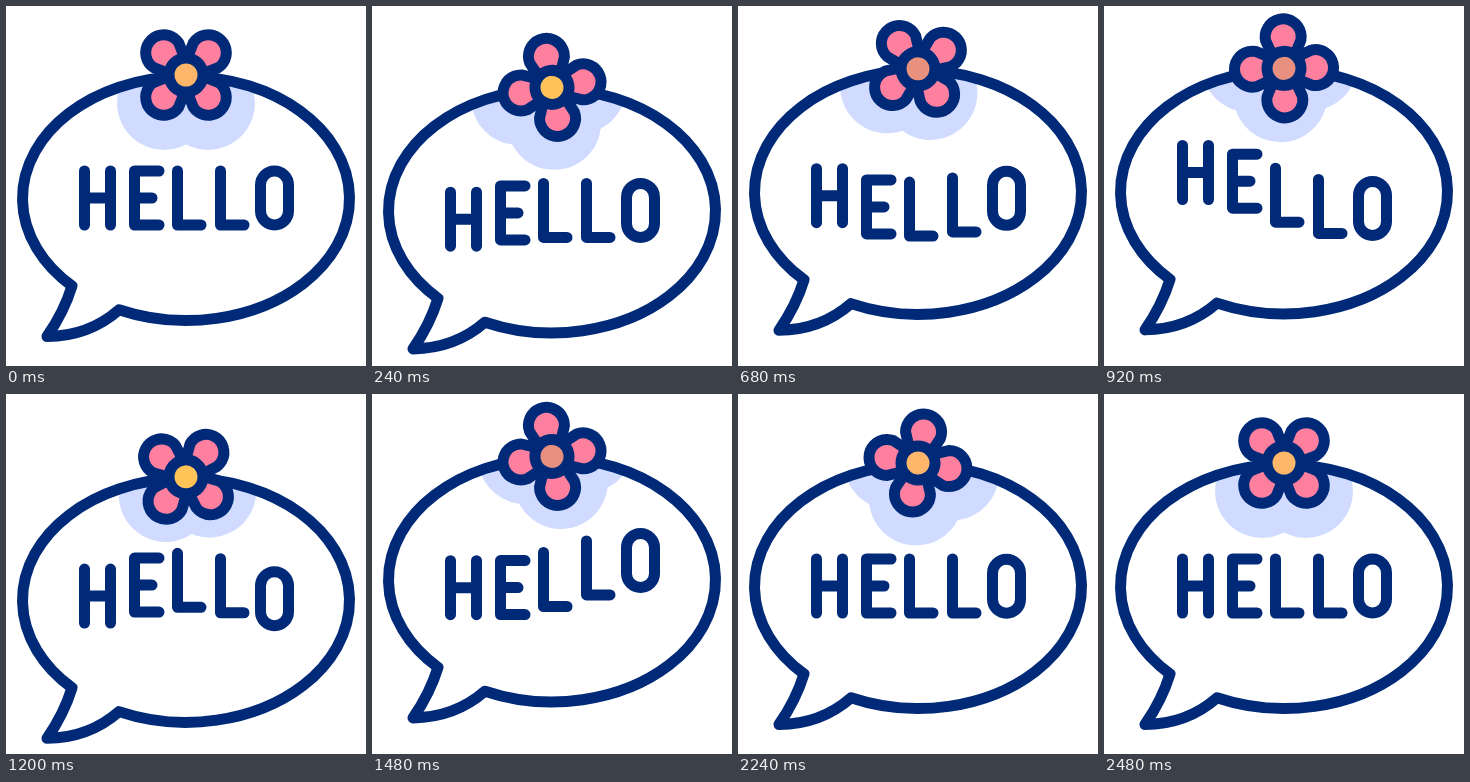
Animation of 360x360 px, one loop 2520 ms. Source, as an HTML page with a canvas:

```html
<!DOCTYPE html>
<html lang="en">
<head>
<meta charset="utf-8">
<title>Hello</title>
<style>
  html, body { margin: 0; width: 100%; height: 100%; overflow: hidden; background: #fff; }
  canvas { display: block; width: 360px; height: 360px; }
</style>
</head>
<body>
<canvas id="stage"></canvas>
<script>
const SIZE = 360, LOOP = 2520, STEP = 40, SPIN = 2480;
const NAVY = '#002a78', PINK = '#ff7f9f', SHADE = '#d0dbff';
const LETTER_DELAY = 120;

// Motion tracks: [time in ms, vertical offset]
const BUBBLE = [[0, 0], [430, 21], [790, -13.5], [1180, 14], [1520, -7.3], [1930, 8], [2240, 0]];
const LETTER = [[0, 0], [480, 17.5], [960, -19.5], [1410, 9], [1800, 0]];

const canvas = document.getElementById('stage');
const ctx = canvas.getContext('2d');
const ratio = window.devicePixelRatio || 1;
canvas.width = canvas.height = SIZE * ratio;

const mix = (a, b, p) => a + (b - a) * p;
const clamp = (v, lo, hi) => Math.min(hi, Math.max(lo, v));

function track(keys, t) {
  if (t <= keys[0][0]) return keys[0][1];
  for (let i = 1; i < keys.length; i++) {
    const [t0, v0] = keys[i - 1], [t1, v1] = keys[i];
    if (t < t1) return mix(v0, v1, (1 - Math.cos(Math.PI * (t - t0) / (t1 - t0))) / 2);
  }
  return keys[keys.length - 1][1];
}

function bubblePath() {
  const path = new Path2D();
  const rad = Math.PI / 180;
  path.ellipse(180, 192.5, 163.5, 122, 0, 134.2 * rad, (360 + 114.2) * rad);
  path.quadraticCurveTo(83, 330, 41, 330.5);
  path.quadraticCurveTo(58, 306, 66, 280);
  path.closePath();
  return path;
}

function petalPath() {
  const path = new Path2D();
  path.moveTo(-9, -8);
  path.lineTo(-17.6, -28);
  path.arc(0, -31.5, 18, Math.PI - 0.2, 0.2);
  path.lineTo(9, -8);
  path.closePath();
  return path;
}

function roundedO() {
  const path = new Path2D();
  path.arc(268.5, 179, 14, Math.PI, 0);
  path.arc(268.5, 205, 14, 0, Math.PI);
  path.closePath();
  return path;
}

const bubble = bubblePath();
const petal = petalPath();
const letters = [
  new Path2D('M78.5 165V219M104.5 165V219M78.5 192H104.5'),
  new Path2D('M153 165H128.5V219H153M128.5 192H146'),
  new Path2D('M171.5 165V219H195'),
  new Path2D('M214.5 165V219H238'),
  roundedO()
];

function circle(x, y, r) {
  ctx.beginPath();
  ctx.arc(x, y, r, 0, Math.PI * 2);
}

function fourTimes(draw) {
  for (let i = 0; i < 4; i++) {
    ctx.save();
    ctx.rotate(Math.PI / 4 + i * Math.PI / 2);
    draw();
    ctx.restore();
  }
}

// The flower's heart warms as the bubble sinks and reddens as it rises.
function heartColor(y) {
  const base = [254, 183, 106];
  const end = y < 0 ? [231, 144, 127] : [255, 200, 78];
  const p = clamp(y < 0 ? -y / 6.5 : y / 20, 0, 1);
  return `rgb(${base.map((c, i) => Math.round(mix(c, end[i], p))).join(',')})`;
}

function drawShadow(turn) {
  ctx.save();
  ctx.clip(bubble);
  ctx.translate(180, 69);
  ctx.rotate(turn);
  ctx.translate(0, 6);
  ctx.fillStyle = SHADE;
  fourTimes(() => {
    circle(0, -31, 47);
    ctx.fill();
  });
  ctx.restore();
}

function drawFlower(turn, y) {
  ctx.save();
  ctx.translate(180, 69);
  ctx.rotate(turn);
  ctx.fillStyle = PINK;
  fourTimes(() => {
    ctx.fill(petal);
    ctx.stroke(petal);
  });
  circle(0, 0, 17);
  ctx.fillStyle = heartColor(y);
  ctx.fill();
  ctx.stroke();
  ctx.restore();
}

function render(t) {
  const y = track(BUBBLE, t);
  const turn = Math.PI * 2 * t / SPIN;

  ctx.setTransform(ratio, 0, 0, ratio, 0, 0);
  ctx.fillStyle = '#fff';
  ctx.fillRect(0, 0, SIZE, SIZE);
  ctx.strokeStyle = NAVY;
  ctx.lineWidth = 11;
  ctx.lineCap = ctx.lineJoin = 'round';

  ctx.translate(0, y);
  drawShadow(turn);
  ctx.stroke(bubble);
  letters.forEach((letter, i) => {
    ctx.save();
    ctx.translate(0, track(LETTER, t - i * LETTER_DELAY));
    ctx.stroke(letter);
    ctx.restore();
  });
  drawFlower(turn, y);
}

const start = performance.now();
function tick() {
  const t = (performance.now() - start) % LOOP;
  render(Math.floor(t / STEP) * STEP);
  requestAnimationFrame(tick);
}
tick();
</script>
</body>
</html>
```
